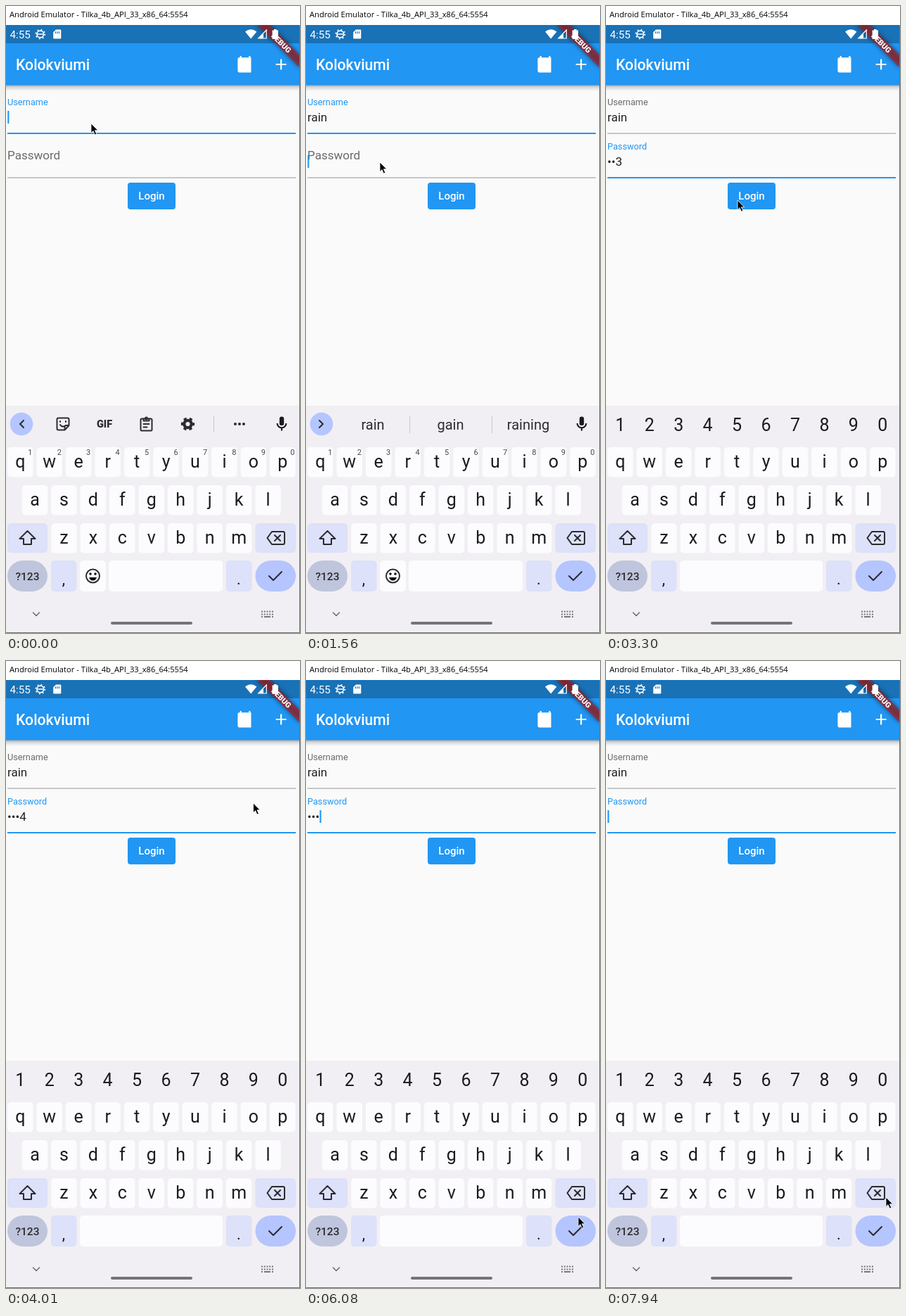
An HTML page that plays this animation: 418 by 891 pixels, repeating every 8000 ms.

```html
<!DOCTYPE html>
<html lang="en">
<head>
<meta charset="utf-8">
<title>Login form</title>
<style>
  html, body { margin: 0; width: 100%; height: 100%; overflow: hidden; background: #fafafa; }
  svg { display: block; width: 100%; height: 100%; font-family: Roboto, sans-serif; }
  .mid { text-anchor: middle; }
  .key { font-size: 25px; fill: #1b1b1f; text-anchor: middle; }
  .line { fill: none; stroke: #2b2b30; stroke-width: 2; stroke-linejoin: round; stroke-linecap: round; }
</style>
</head>
<body>
<svg viewBox="0 0 418 891" preserveAspectRatio="none">
  <defs>
    <linearGradient id="shade" x2="0" y2="1">
      <stop offset="0" stop-color="#000" stop-opacity=".36"/>
      <stop offset=".4" stop-color="#000" stop-opacity=".13"/>
      <stop offset="1" stop-color="#000" stop-opacity="0"/>
    </linearGradient>
    <filter id="blur" x="-30%" y="-150%" width="160%" height="400%"><feGaussianBlur stdDeviation="3"/></filter>
    <clipPath id="app"><rect y="27" width="417" height="864"/></clipPath>
  </defs>

  <rect width="418" height="891" fill="#fafafa"/>
  <rect width="418" height="27" fill="#fff"/>
  <text x="5" y="16" font-size="11.2" font-family="'Open Sans', sans-serif">Android Emulator - Tilka_4b_API_33_x86_64:5554</text>

  <!-- app bar -->
  <rect y="112" width="417" height="9" fill="url(#shade)"/>
  <rect y="53" width="417" height="59.5" fill="#2196f3"/>
  <rect y="27" width="417" height="26" fill="#1971b6"/>
  <text x="14" y="91" font-size="21.2" font-weight="500" fill="#fff">Kolokviumi</text>
  <g fill="#fff">
    <path transform="translate(327.3 70) scale(1.06)" fill-rule="evenodd" d="M20 3h-1V1h-2v2H7V1H5v2H4c-1.1 0-2 .9-2 2v16c0 1.1.9 2 2 2h16c1.100 2-.9 2-2V5c0-1.100-.9-2-2-2zM20 21H4V8h16z"/>
    <path transform="translate(378.400 70.300) scale(1.06)" d="M19 13h-6v6h-2v-6H5v-2h6V5h2v6h6z"/>
  </g>

  <g clip-path="url(#app)">
    <g transform="translate(417 27) rotate(45)">
      <rect x="-42.4" y="29.7" width="84.8" height="12.7" fill="#000" opacity=".5" filter="url(#blur)"/>
      <rect x="-42.4" y="29.7" width="84.8" height="12.7" fill="#b71c1c" opacity=".627"/>
      <text class="mid" y="39.9" font-size="10.8" font-weight="900" fill="#fff">DEBUG</text>
    </g>
  </g>

  <!-- status bar -->
  <g fill="#fff">
    <text x="5.500" y="46" font-size="15.2">4:55</text>
    <g fill="none" stroke="#fff" transform="translate(48.800 40)">
      <circle r="4.800" stroke-width="1.700"/>
      <circle r="6.500" stroke-width="1.800" stroke-dasharray="1.800 3.305"/>
      <path d="M-4 0H4" stroke-width="1.500"/>
    </g>
    <path d="M71 33.500h6q1.300 0 1.300 1.300v10.400q0 1.300-1.300 1.300h-8.500q-1.300 0-1.300-1.300v-8z"/>
    <path d="M70.500 36.200v3M73 36.200v3M75.500 36.200v3" stroke="#1971b6" stroke-width="1.200"/>
    <path d="M340 36.500q8.200-6.400 16.400 0l-8.200 10z"/>
    <path d="M370.300 34v12h-11.500z" fill="none" stroke="#fff" stroke-width="1.200"/>
    <path d="M366 39.500v6.500h-7z"/>
    <path d="M381 33h3.600v1.400h2.400v12.600h-8.400v-12.600h2.400z"/>
  </g>

  <!-- form -->
  <g id="userLine"></g>
  <rect id="userRule" x="2" width="410"/>
  <rect id="passRule" x="2" width="410"/>
  <text id="userLabel" x="2" y="141" font-size="12.72">Username</text>
  <text id="passLabel" x="2">Password</text>
  <text id="user" x="2" y="163.700" font-size="17" fill="#212121"></text>
  <text id="pass" x="2" y="226.700" font-size="17" fill="#212121"></text>
  <rect id="caret" width="2.100" height="18" fill="#2196f3"/>
  <rect x="173" y="251" width="68" height="38" rx="4" fill="#2196f3"/>
  <text class="mid" x="207" y="275" font-size="15" font-weight="500" fill="#fff">Login</text>

  <!-- keyboard -->
  <rect y="568" width="417" height="323" fill="#f1eff3"/>
  <g id="keys"></g>
  <g id="hints" font-size="11" fill="#46464f" class="mid"></g>
  <g id="digits"></g>
  <g id="smile">
    <rect x="105" y="788" width="37" height="44" rx="5" fill="#fcfcfe"/>
    <g transform="translate(123.500 810)">
      <circle class="line" r="9.500"/>
      <circle cx="-3.500" cy="-3" r="1.700"/><circle cx="3.500" cy="-3" r="1.700"/>
      <path d="M-5.500 2h11q-1.700 4.500-5.500 4.500t-5.500-4.500z"/>
    </g>
  </g>
  <g id="special"></g>

  <!-- strip above the keys -->
  <g id="strip">
    <circle cx="22" cy="594" r="16.300" fill="#b4c5ff"/>
    <path id="arrow" class="line" d="M3-5l-5 5 5 5"/>
    <g transform="translate(392 594) scale(1.060) translate(-12 -12)" fill="#1b1b1f">
      <rect x="9" y="2" width="6" height="12" rx="3"/>
      <path d="M6 11a6 6 0 0 0 12 0M12 17v4" fill="none" stroke="#1b1b1f" stroke-width="2"/>
    </g>
  </g>
  <g id="tools">
    <g class="line" transform="translate(81 594)">
      <path d="M8.500 2v-8.500q0-2-2-2h-13q-2 0-2 2v13q0 2 2 2h9zM8.500 2h-4q-2 0-2 2v4.500" class="line"/>
      <path d="M-4-4v1M4-4v1M-4 1q2.500 4 6 2"/>
    </g>
    <text class="mid" x="140" y="599" font-size="14.500" font-weight="900" fill="#2b2b30">GIF</text>
    <g class="line" transform="translate(199.500 594)">
      <rect x="-8" y="-7.500" width="16" height="17" rx="1.500"/>
      <path d="M-4-7.500v3h8v-3M-4 0h8M-4 4.500h5"/>
      <circle cy="-8" r="1.500"/>
    </g>
    <g fill="none" stroke="#2b2b30" transform="translate(258.500 594)">
      <circle r="5.200" stroke-width="4.200"/>
      <circle r="8" stroke-width="3.200" stroke-dasharray="4.200 4.178" stroke-dashoffset="2.100"/>
    </g>
    <path d="M295.500 582v24" stroke="#c8c7ce"/>
    <g fill="#2b2b30"><circle cx="326" cy="594" r="2"/><circle cx="332" cy="594" r="2"/><circle cx="338" cy="594" r="2"/></g>
  </g>
  <g id="words" class="mid" font-size="20" fill="#2b2b30">
    <text x="95" y="602">rain</text><text x="205.500" y="602">gain</text><text x="316" y="602">raining</text>
    <path d="M147.500 582v25M264.500 582v25" stroke="#c8c7ce"/>
  </g>

  <!-- navigation bar -->
  <path class="line" d="M38.500 862l4.500 4.500 4.500-4.500" style="stroke:#6a6a70;stroke-width:1.500"/>
  <rect x="149" y="875" width="116" height="4" rx="2" fill="#74737a"/>
  <g fill="none" stroke="#77767c" stroke-width="2">
    <path d="M363 860.500h17M363 864.500h17" stroke-dasharray="2 1.750"/>
    <path d="M363 868h2M367 868h9M378 868h2"/>
  </g>
  <path d="M417.500 27v863.500H0" fill="none" stroke="#707070"/>

  <path id="mouse" d="M0 0v13.500l3-2.900 2.400 5.400 2.400-1-2.400-5.200h4.300z" fill="#000" stroke="#fff" stroke-width=".8"/>
</svg>
<script>
const LOOP = 8000, BLUE = '#2196f3', GREY = '#6a6a6a';
const $ = id => document.getElementById(id);

function add(parent, tag, attrs, text) {
  const el = document.createElementNS('http://www.w3.org/2000/svg', tag);
  set(el, attrs);
  if (text) el.textContent = text;
  return parent.appendChild(el);
}
function set(el, attrs) {
  for (const k in attrs) el.setAttribute(k, attrs[k]);
}
function show(el, on) { el.style.display = on ? '' : 'none'; }

const STEP = 41.45, keys = $('keys'), special = $('special');
function box(parent, x, y, w, h, fill, rx = 5) {
  return add(parent, 'rect', { x, y, width: w, height: h, rx, fill });
}
[['qwertyuiop', 20.3, 627], ['asdfghjkl', 41, 681], ['zxcvbnm', 82.4, 735]].forEach(([row, x0, y]) => {
  [...row].forEach((c, i) => {
    const x = x0 + i * STEP;
    box(keys, x - 18.2, y, 36.4, 42.5, '#fcfcfe');
    add(keys, 'text', { class: 'key', x, y: y + 28.7 }, c);
  });
});
[...'1234567890'].forEach((c, i) => {
  const x = 20.3 + i * STEP;
  add($('hints'), 'text', { x: x + 14, y: 638 }, c);
  add($('digits'), 'text', { class: 'key', x, y: 604 }, c);
});
const space = box(keys, 146, 788, 162, 44, '#fcfcfe');

const TINT = '#dde1f9';
box(special, 2, 735, 57, 42, TINT);
box(special, 354.500, 735, 57.500, 42, TINT);
box(special, 64, 788, 36.500, 44, TINT);
box(special, 313, 788, 36.500, 44, TINT);
box(special, 2, 788, 57, 44, '#bfc5dc', 22);
box(special, 354.500, 788, 57.500, 44, '#b4c5ff', 22);
add(special, 'text', { class: 'mid', x: 30.5, y: 816, 'font-size': 15.5, 'font-weight': 500, fill: '#2b2b30' }, '?123');
add(special, 'text', { class: 'key', x: 82, y: 822, style: 'font-size:22px' }, ',');
add(special, 'text', { class: 'key', x: 331, y: 822, style: 'font-size:22px' }, '.');
[
  [30.5, 756, 'M0-10l11 11h-5.500v8h-11v-8h-5.500z'],
  [384, 756, 'M-6-9h16q2 0 2 2v14q0 2-2 2h-16l-6.500-9zM-2-4l8 8M6-4l-8 8'],
  [383, 810, 'M-9 0l6 6L9-6']
].forEach(([x, y, d]) => add(special, 'path', { class: 'line', d, transform: `translate(${x} ${y})` }));

// moments at which the screen refreshes
const TICKS = [0, 280, 420, 570, 710, 860, 1000, 1150, 1290,
  1440, 1560, 1680, 1810, 1940, 2070, 2200, 2340,
  2490, 2630, 2760, 2900, 3030, 3160, 3300, 3460,
  3610, 3750, 3880, 4020, 4150, 4290, 4420, 4560,
  4710, 4830, 4980, 5110, 5250, 5380, 5510, 5650,
  5800, 5940, 6080, 6200, 6340, 6470, 6610, 6740,
  6860, 7000, 7140, 7270, 7410, 7550, 7690, 7820, 7940];

// [time, value], each held until the next
const USER = [[0, ''], [280, 'r'], [570, 'ra'], [860, 'rai'], [1000, 'rain']];
const PASS = [[0, ''], [2070, '1'], [2200, '•2'], [2760, '••3'], [3460, '•••4'], [4710, '••••'],
  [5650, '•••'], [6860, '••'], [7410, '•'], [7940, '']];
const CARET = [[0, 1], [3300, 0], [3460, 1], [3880, 0], [4290, 1], [4710, 0], [5250, 1],
  [6200, 0], [6610, 1]];
// [time, x, y], moving evenly in between
const MOUSE = [[0, 121, 167], [1290, 121, 167], [1560, 105, 222], [1810, 108, 225], [2340, 185, 266],
  [3300, 187, 276], [3460, 187, 276], [3750, 353, 60], [4020, 350, 355], [4290, 180, 435],
  [4560, 32, 360], [4830, 90, 282], [5110, 210, 460], [5510, 384, 752], [5800, 385, 758],
  [6080, 387, 790], [6340, 392, 810], [6740, 397, 765], [7940, 398, 762], [8000, 398, 762]];

const held = (table, t) => table.findLast(row => row[0] <= t)[1];

function mouseAt(t) {
  const i = MOUSE.findLastIndex(row => row[0] <= t);
  const a = MOUSE[i], b = MOUSE[i + 1] || a;
  const k = b === a ? 0 : (t - a[0]) / (b[0] - a[0]);
  return [a[1] + (b[1] - a[1]) * k, a[2] + (b[2] - a[2]) * k];
}

function rule(el, y, focused) {
  set(el, focused ? { y: y - 1, height: 2, fill: BLUE } : { y: y - 0.5, height: 1.1, fill: '#a0a0a0' });
}

function draw(t) {
  const lift = Math.min(1, Math.max(0, (t - 1560) / 200));
  const onPass = t >= 1440, moved = lift > 0, numeric = t >= 1940, typed = t >= 420;

  $('user').textContent = held(USER, t);
  $('pass').textContent = held(PASS, t);
  set($('userLabel'), { fill: moved ? GREY : BLUE });
  set($('passLabel'), {
    y: 217.5 - 13.5 * lift,
    'font-size': 17 - 4.28 * lift,
    fill: moved ? BLUE : GREY
  });
  rule($('userRule'), 181, !moved);
  rule($('passRule'), 244, moved);

  const field = $(onPass ? 'pass' : 'user');
  const end = field.textContent ? field.getComputedTextLength() : 0;
  set($('caret'), { x: 2.3 + end, y: onPass ? 212 : 149 });
  show($('caret'), held(CARET, t));

  show($('strip'), !numeric);
  show($('tools'), !typed);
  show($('words'), typed && !numeric);
  show($('hints'), !numeric);
  show($('digits'), numeric);
  show($('smile'), !numeric);
  set(space, numeric ? { x: 105, width: 203 } : { x: 146, width: 162 });
  set($('arrow'), { transform: `translate(22 594) scale(${typed ? -1 : 1} 1)` });

  set($('mouse'), { transform: `translate(${mouseAt(t)})` });
}

function tick() {
  const t = performance.now() % LOOP;
  draw(TICKS.findLast(m => m <= t));
  requestAnimationFrame(tick);
}
tick();
</script>
</body>
</html>
```
